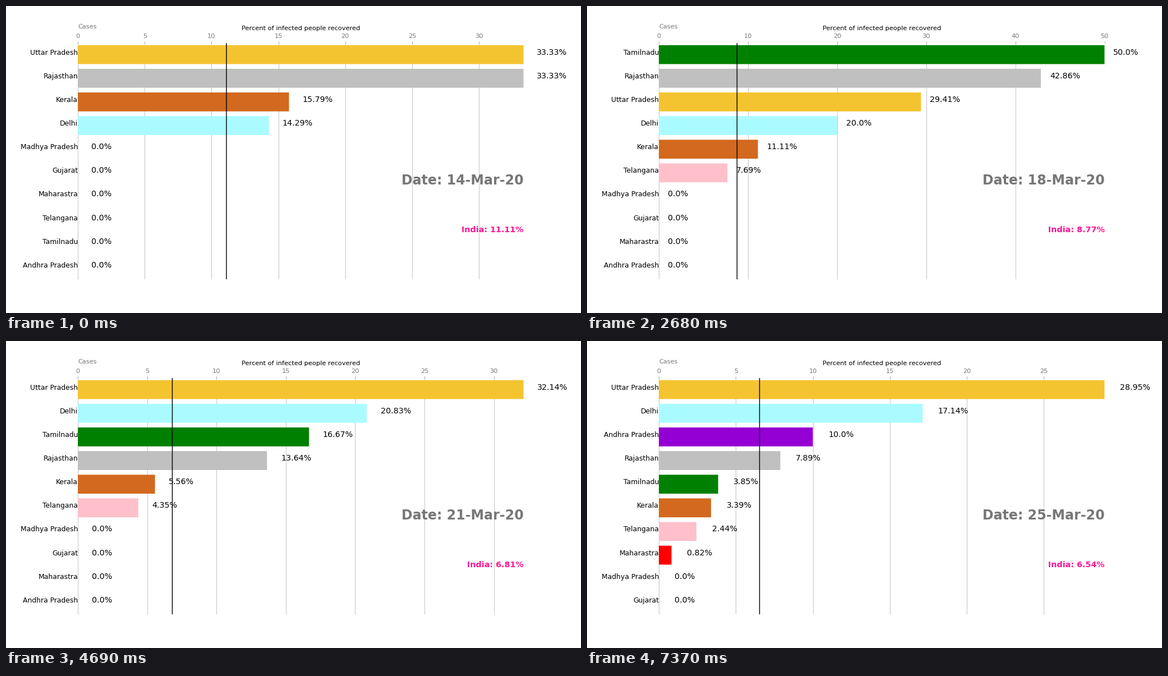
Write a matplotlib script that moves like this. It is 1025 by 547 pixels and loops after 8 s.

```python
import matplotlib.pyplot as plt
import numpy as np
from matplotlib.animation import FuncAnimation

WIDTH, HEIGHT, DPI = 1025, 547, 1025 / 15
LOOP_MS, DAYS, FIRST_DAY = 8000, 12, 14
GREY = "#777777"

# Bar colour, recoveries as steps from a day on, infections as key points
# that are joined by straight lines. The order of the states settles ties.
STATES = {
    "Uttar Pradesh": ("#f4c430", {0: 4, 4: 5, 5: 9, 10: 11},
                      {0: 12, 3: 13, 4: 17, 5: 20, 7: 28, 9: 32, 11: 38}),
    "Rajasthan": ("silver", {0: 1, 1: 3},
                  {0: 3, 1: 4, 3: 4, 4: 7, 5: 7, 6: 17, 8: 28, 10: 32, 11: 38}),
    "Kerala": ("chocolate", {0: 3, 10: 4},
               {0: 19, 2: 27, 4: 27, 6: 40, 8: 67, 10: 109, 11: 118}),
    "Delhi": ("#aafbff", {0: 1, 1: 2, 6: 5, 10: 6},
              {0: 7, 3: 7, 4: 10, 6: 20, 8: 27, 10: 30, 11: 35}),
    "Madhya Pradesh": ("white", {0: 0}, {0: 1}),
    "Gujarat": ("white", {0: 0}, {0: 1}),
    "Maharastra": ("red", {0: 0, 11: 1}, {11: 122}),
    "Telangana": ("pink", {0: 0, 1: 1},
                  {1: 3, 2: 4, 4: 13, 6: 19, 8: 27, 10: 37, 11: 41}),
    "Tamilnadu": ("green", {0: 0, 2: 1},
                  {3: 1, 4: 2, 5: 3, 6: 3, 8: 9, 10: 18, 11: 26}),
    "Andhra Pradesh": ("darkviolet", {0: 0, 11: 1}, {11: 10}),
}
ELSEWHERE_RECOVERED = {0: 0, 8: 1, 10: 11, 11: 15}
INDIA_INFECTED = {0: 81, 2: 123, 3: 126, 4: 171, 6: 245, 8: 401, 10: 525, 11: 657}

plt.rcParams["font.family"] = "DejaVu Sans"
# The tiny surplus keeps the pixel size from being truncated downwards.
fig, ax = plt.subplots(
    figsize=((WIDTH + 1e-4) / DPI, (HEIGHT + 1e-4) / DPI), dpi=DPI)


def step(points, day):
    return points[max(start for start in points if start <= day)]


def percent(recovered, infected, day):
    cases = round(np.interp(day, list(infected), list(infected.values())))
    return round(100 * recovered / cases, 2)


def state_rate(state, day):
    _, recovered, infected = STATES[state]
    return percent(step(recovered, day), infected, day)


def india_rate(day):
    recovered = sum(step(steps, day) for _, steps, _ in STATES.values())
    recovered += step(ELSEWHERE_RECOVERED, day)
    return percent(recovered, INDIA_INFECTED, day)


def note(x, y, text, size, color, **style):
    ax.text(x, y, text, transform=ax.transAxes, size=size, color=color, **style)


def draw_day(day):
    ax.clear()
    rates = {state: state_rate(state, day) for state in STATES}
    ranked = sorted(rates, key=lambda state: -rates[state])[::-1]
    values = [rates[state] for state in ranked]
    india = india_rate(day)

    ax.barh(range(len(ranked)), values, snap=False,
            color=[STATES[state][0] for state in ranked])
    for row, (state, value) in enumerate(zip(ranked, values)):
        ax.text(0, row, state, size=13, ha="right")
        ax.text(value + 1, row, f"{value}%", size=15, ha="left")
    ax.axvline(india, color="black", snap=False)

    note(1, 0.4, f"Date: {FIRST_DAY + day}-Mar-20", 25, GREY,
         ha="right", weight="bold")
    note(1, 0.2, f"India: {india}%", 15, "deeppink", ha="right", weight="bold")
    note(0, 1.06, "Cases", 12, GREY)
    ax.set_title("Percent of infected people recovered", size=12)

    ax.margins(0, 0.01)
    ax.set_xlim(0, max(values))
    ax.xaxis.set_ticks_position("top")
    ax.tick_params(axis="x", colors=GREY, labelsize=12)
    ax.set_yticks([])
    ax.grid(which="major", axis="x", linestyle="-")
    ax.set_axisbelow(True)
    ax.set_frame_on(False)


animation = FuncAnimation(fig, draw_day, frames=DAYS,
                          interval=LOOP_MS / DAYS, repeat=True, repeat_delay=0)
plt.show()
```
